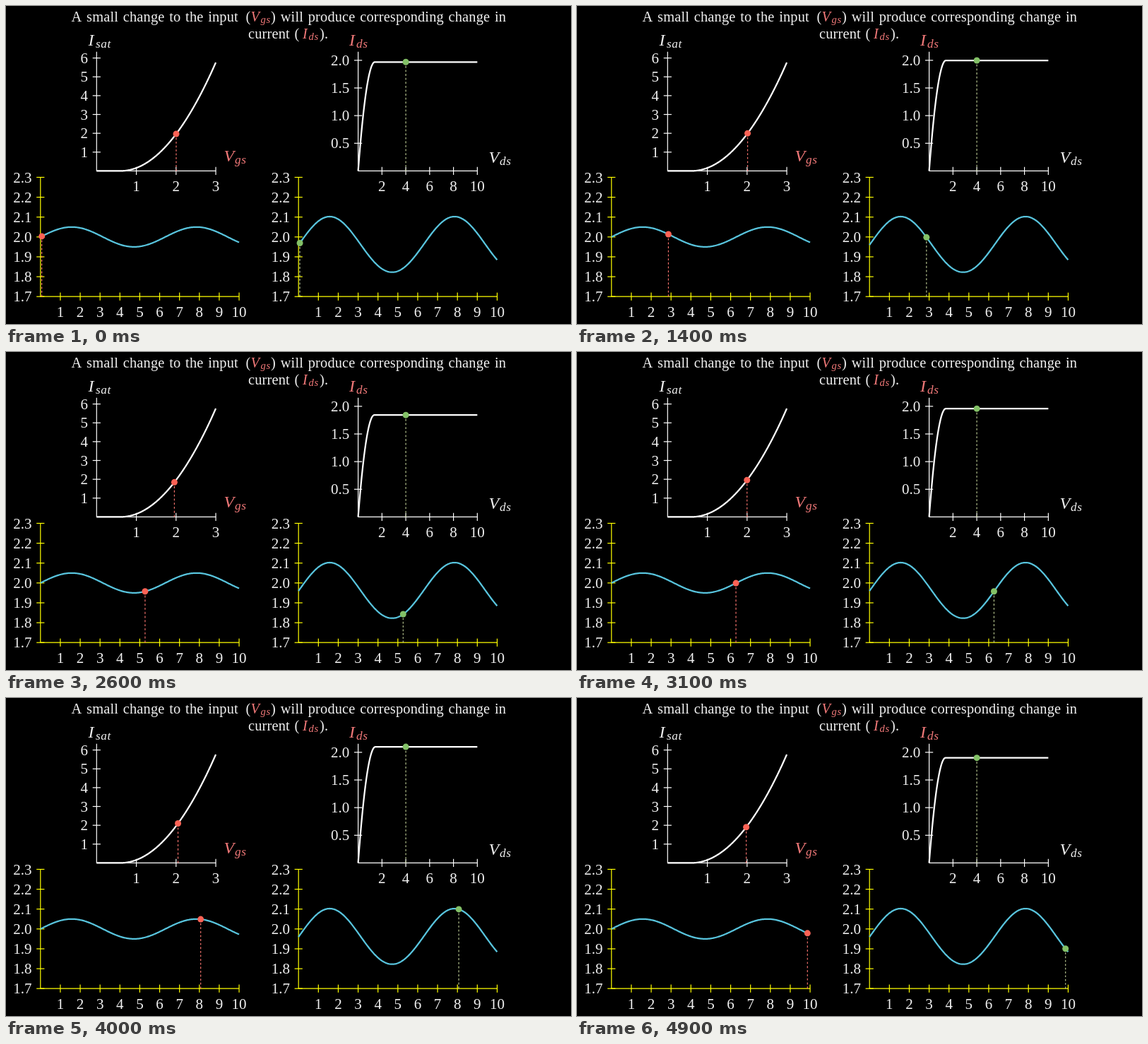
An HTML page with a canvas for the animation above (5000 ms loop, 800 by 450 pixels).

```html
<!DOCTYPE html>
<html lang="en">
<head>
<meta charset="utf-8">
<title>Small-signal change</title>
<style>
html, body { margin: 0; width: 100%; height: 100%; overflow: hidden; background: #000; }
canvas { display: block; }
</style>
</head>
<body>
<canvas id="stage" width="800" height="450"></canvas>
<script>
const ctx = document.getElementById('stage').getContext('2d');
const WHITE = '#fff', INK = '#f0f0f0', YELLOW = '#ffff00', BLUE = '#58c4dd';
const RED = '#fc6255', PINK = '#f07878', ROSE = '#f0706a', GREEN = '#83c167', PALE = '#b2c08c';
const SERIF = '"Liberation Serif", "Times New Roman", serif';
const VT = 0.6, HEIGHT = 168.75, TICK = 5.6;

const gate = x => 2 + 0.05 * Math.sin(x);
const drive = v => Math.max(v - VT, 0);
const sat = v => drive(v) ** 2;
const drain = (v, vgs) => {
  const u = Math.min(v, drive(vgs));
  return 2 * drive(vgs) * u - u * u;
};

// A chart maps values to pixels from its lower left corner.
function chart(left, bottom, width, xMax, yMin, yMax, xs, ys, digits, color) {
  return {
    left, bottom, width, xMax, yMin, xs, ys, digits, color,
    X: v => left + v * width / xMax,
    Y: v => bottom - (v - yMin) * HEIGHT / (yMax - yMin)
  };
}
const steps = (from, count, by) => Array.from({ length: count }, (_, i) => from + i * by);
const tens = steps(1, 10, 1);
const volts = steps(1.7, 7, 0.1);

const transfer = chart(128.3, 233.4, HEIGHT, 3, 0, 6.336, [1, 2, 3], steps(1, 6, 1), 0, WHITE);
const output = chart(498.6, 233.4, HEIGHT, 10, 0, 2.156, [2, 4, 6, 8, 10], steps(0.5, 4, 0.5), 1, WHITE);
const input = chart(48.8, 411.2, 281.25, 10, 1.7, 2.3, tens, volts, 1, YELLOW);
const current = chart(414.2, 411.2, 281.25, 10, 1.7, 2.3, tens, volts, 1, YELLOW);

function text(str, x, y, size, color = INK, align = 'left', style = '') {
  ctx.font = `${style} ${size}px ${SERIF}`;
  ctx.textAlign = align;
  ctx.fillStyle = color;
  ctx.fillText(str, x, y);
}

function symbol(main, sub, x, y, size, gap, color) {
  text(main, x, y, size, color, 'left', 'italic');
  ctx.letterSpacing = '0.6px';
  text(sub, x + gap, y + size * 0.13, size * 0.72, color, 'left', 'italic');
  ctx.letterSpacing = '0px';
}

function line(x1, y1, x2, y2) {
  ctx.beginPath();
  ctx.moveTo(x1, y1);
  ctx.lineTo(x2, y2);
  ctx.stroke();
}

function axes(c) {
  ctx.strokeStyle = c.color;
  ctx.lineWidth = 1.2;
  line(c.left, c.bottom, c.left + c.width, c.bottom);
  line(c.left, c.bottom, c.left, c.bottom - HEIGHT);
  for (const v of c.xs) {
    line(c.X(v), c.bottom - TICK, c.X(v), c.bottom + TICK);
    text(v, c.X(v), c.bottom + 28.6, 21, INK, 'center');
  }
  for (const v of c.ys) {
    line(c.left - TICK, c.Y(v), c.left + TICK, c.Y(v));
    text(v.toFixed(c.digits), c.left - 12.3, c.Y(v) + 7.2, 21, INK, 'right');
  }
}

function plot(c, fn, color) {
  ctx.strokeStyle = color;
  ctx.lineWidth = 2.25;
  ctx.beginPath();
  for (let i = 0; i <= 300; i++) {
    const v = c.xMax * i / 300;
    ctx.lineTo(c.X(v), c.Y(fn(v)));
  }
  ctx.stroke();
}

function marker(c, v, value, color, dashColor) {
  const x = c.X(v), y = c.Y(value), length = c.bottom - y;
  const dash = length / (2 * Math.ceil(length / 5.625) - 1);
  ctx.strokeStyle = dashColor;
  ctx.lineWidth = 1.2;
  ctx.setLineDash([dash, dash]);
  line(x, c.bottom, x, y);
  ctx.setLineDash([]);
  ctx.fillStyle = color;
  ctx.beginPath();
  ctx.arc(x, y, 4.5, 0, 2 * Math.PI);
  ctx.fill();
}

function heading() {
  const phrase = (str, x, y) => {
    ctx.letterSpacing = '0.15px';
    ctx.wordSpacing = '1.5px';
    text(str, x, y, 20.4);
    ctx.letterSpacing = ctx.wordSpacing = '0px';
  };
  phrase('A small change to the input', 92.5, 21.5);
  phrase('(', 339.5, 21.5);
  symbol('V', 'gs', 346.5, 21.5, 20.4, 14, PINK);
  phrase(') will produce corresponding change in', 375, 21.5);
  phrase('current (', 343, 45.5);
  symbol('I', 'ds', 420, 45.5, 20.4, 8.5, PINK);
  phrase(').', 444, 45.5);
}

function draw(x) {
  const vgs = gate(x), ids = sat(vgs);
  ctx.fillStyle = '#000';
  ctx.fillRect(0, 0, 800, 450);
  heading();
  [transfer, output, input, current].forEach(axes);
  symbol('I', 'sat', 116.5, 56, 24, 10.5, INK);
  symbol('V', 'gs', 308.5, 219.5, 24, 15.5, PINK);
  symbol('I', 'ds', 486, 56, 24, 10, PINK);
  symbol('V', 'ds', 683.5, 222, 24, 15.5, INK);

  plot(transfer, sat, WHITE);
  plot(output, v => drain(v, vgs), WHITE);
  plot(input, gate, BLUE);
  plot(current, v => sat(gate(v)), BLUE);

  marker(transfer, vgs, ids, RED, ROSE);
  marker(output, 4, ids, GREEN, PALE);
  marker(input, x, vgs, RED, ROSE);
  marker(current, x, ids, GREEN, PALE);
}

// The phase advances in tenths of a second.
function tick() {
  const step = Math.floor((performance.now() + 0.01) % 5000 / 100);
  draw(1 / 15 + step / 5);
  requestAnimationFrame(tick);
}
tick();
</script>
</body>
</html>
```
